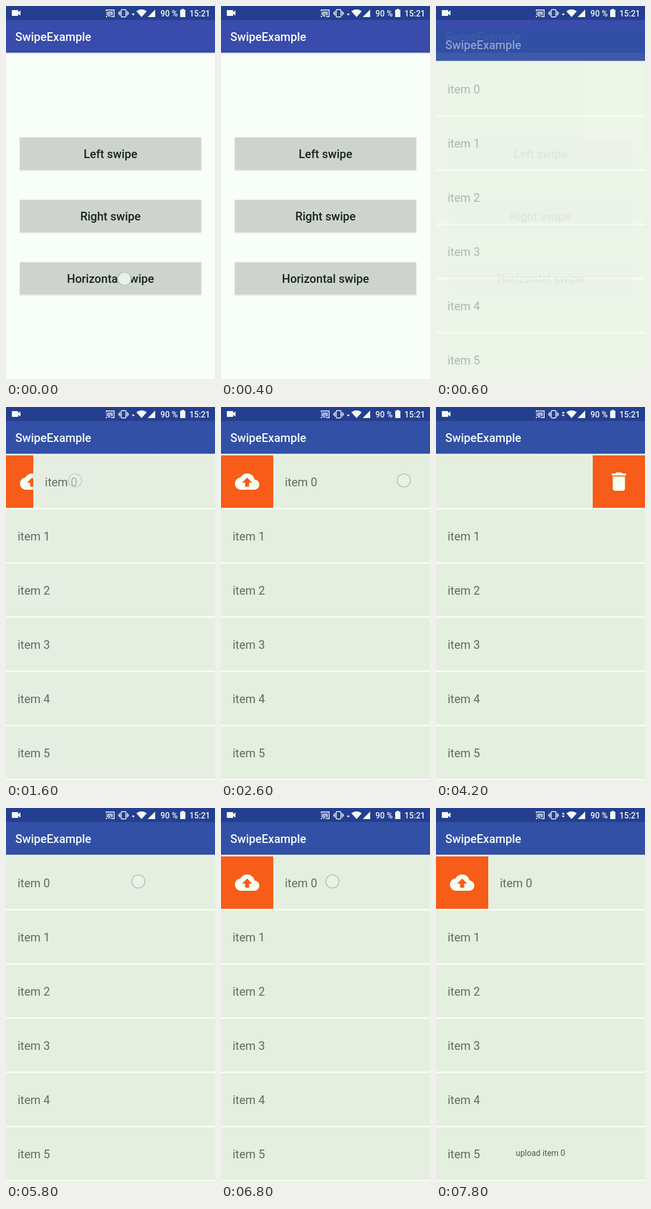
Write an HTML page that moves like this. It is 360x640 px and loops after 8000 ms.

```html
<!DOCTYPE html>
<html lang="en">
<head>
<meta charset="utf-8">
<title>Swipe list</title>
<style>
html, body { margin: 0; width: 100%; height: 100%; overflow: hidden; background: #f7fff8; }
svg { display: block; width: 100%; height: 100%; }
text { font: 20px Roboto, sans-serif; fill: #5f6c5f; }
.title { font-weight: 500; fill: #f6fbfa; }
.label { font-weight: 500; fill: #17251d; text-anchor: middle; }
.status text { font-size: 14px; font-weight: 500; fill: #f4f9fa; }
.toast { font-size: 14px; fill: #4f5a50; text-anchor: middle; }
</style>
</head>
<body>
<svg viewBox="0 0 360 640">
  <defs>
    <linearGradient id="shade" x2="0" y2="1">
      <stop stop-color="#6f8398" stop-opacity=".4"/>
      <stop offset="1" stop-color="#b9c6bf" stop-opacity="0"/>
    </linearGradient>
  </defs>

  <g id="menu">
    <rect width="360" height="640" fill="#f7fff8"/>
    <rect y="24" width="360" height="56" fill="#394bab"/>
    <rect y="80" width="360" height="3" fill="url(#shade)"/>
    <text class="title" x="16" y="60">SwipeExample</text>
    <g id="buttons"></g>
  </g>

  <g id="list">
    <rect y="24" width="360" height="640" fill="#f5fdf0"/>
    <g id="rows" class="content"></g>
    <g id="upload">
      <rect y="83" width="90" height="90" fill="#f75c19"/>
      <path transform="translate(24 107) scale(1.75)" fill="#f7fff0" d="M19.35 10.04C18.67 6.59 15.64 4 12 4 9.11 4 6.6 5.64 5.35 8.04 2.34 8.36 0 10.91 0 14c0 3.31 2.69 6 6 6h13c2.76 0 5-2.24 5-5 0-2.64-2.05-4.78-4.65-4.96zM14 13v4h-4v-4H7l5-5 5 5h-3z"/>
    </g>
    <g id="trash">
      <rect x="270" y="83" width="90" height="90" fill="#f75c19"/>
      <path transform="translate(294 107) scale(1.75)" fill="#f7fff0" d="M6 19c0 1.1.9 2 2 2h8c1.1 0 2-.9 2-2V7H6v12zM19 4h-3.5l-1-1h-5l-1 1H5v2h14V4z"/>
    </g>
    <g id="swiped" class="content"></g>
    <rect y="24" width="360" height="56" fill="#3250a6"/>
    <rect y="80" width="360" height="3" fill="url(#shade)"/>
    <text class="title content" x="16" y="60">SwipeExample</text>
  </g>

  <text class="toast" id="toast" x="180" y="597">upload item 0</text>

  <g class="status" fill="#f4f9fa">
    <rect width="360" height="24" fill="#243f90"/>
    <path d="M11 7h9q1 0 1 1v2.500l4-3v9l-4-3V16q0 1-1 1h-9q-1 0-1-1V8q0-1 1-1z"/>
    <g fill="none" stroke="#f4f9fa" stroke-width="1.400">
      <path d="M172.700 9V6.700h13.600v11.600H181M172.700 11.300a7 7 0 0 1 6.500 7M172.700 14a4.300 4.300 0 0 1 4 4.300"/>
      <rect x="198.500" y="6.200" width="8" height="12.600" rx="1"/>
      <path d="M196.300 8.500v8M194.300 10.500v4M208.700 8.500v8M210.700 10.500v4"/>
    </g>
    <rect x="172" y="17" width="2" height="2"/>
    <path d="M175 9.300h9v6.700h-3q-1.500-4-6-5z" opacity=".65"/>
    <path d="M216.700 13h5l-2.500 3.500z"/>
    <path id="sending" d="M216.700 11h5l-2.500-3.500z"/>
    <path d="M224.500 9q9-6.500 18 0l-9 10z"/>
    <path d="M257 6v13h-13z"/>
    <path d="M302.500 5h4v1.500h2.500V19h-9V6.500h2.500z"/>
    <text x="266" y="17.500">90 %</text>
    <text x="316" y="17.500">15:21</text>
  </g>

  <circle id="touch" r="11.300" fill="#eaf2e8" stroke="#b4c3bf" stroke-width="1.600"/>
</svg>

<script>
const DURATION = 8000, TICK = 200, FADE_IN = 500, FADE_OUT = 300;
const byId = id => document.getElementById(id);
const clamp = (v, low, high) => Math.min(high, Math.max(low, v));
const progress = (t, from, to) => clamp((t - from) / (to - from), 0, 1);

byId('buttons').innerHTML = ['Left swipe', 'Right swipe', 'Horizontal swipe'].map((name, i) => {
  const y = 226 + i * 107;
  return `<rect x="23" y="${y - 1}" width="314" height="58" rx="2" fill="#e2e9e2"/>
    <rect x="24" y="${y}" width="312" height="55" rx="1" fill="#ced4cd"/>
    <text class="label" x="180" y="${y + 35}">${name}</text>`;
}).join('');

const row = i => `<rect class="row" y="${83 + i * 93}" width="360" height="90"/>
  <text x="20" y="${136 + i * 93}">item ${i}</text>`;
byId('rows').innerHTML = [1, 2, 3, 4, 5].map(row).join('');
byId('swiped').innerHTML = row(0);

// A finger slides from x to x; "rest" is where the row settles.
const drags = [
  { start: 1360, end: 2600, from: 72, to: 315, rest: 90 },
  { start: 2700, end: 3800, from: 300, to: 110, rest: -90 },
  { start: 4600, end: 5800, from: 90, to: 228, rest: 0 },
  { start: 6200, end: 7200, from: 75, to: 270, rest: 90 }
];
const taps = [
  { start: -500, end: 0, from: 204, to: 204, y: 468 },
  { start: 7300, end: 7500, from: 45, to: 45, y: 128 }
];
const touches = [...drags, ...taps];

// The row follows the finger until it meets the resting place.
function rowShift(t) {
  return drags.reduce((shift, { start, end, from, to, rest }) => {
    const moved = shift + (to - from) * progress(t, start, end);
    return clamp(moved, Math.min(shift, rest), Math.max(shift, rest));
  }, 0);
}

function drawTouch(t) {
  const touch = touches.find(({ start, end }) => t >= start && t < end + FADE_OUT);
  show('touch', touch);
  if (!touch) return;
  const { start, end, from, to, y = 126 } = touch;
  const x = from + (to - from) * progress(t, start, end);
  const strength = progress(t, start, start + FADE_IN) * (1 - progress(t, end, end + FADE_OUT));
  byId('touch').setAttribute('transform', `translate(${x} ${y})`);
  byId('touch').setAttribute('fill-opacity', strength);
  byId('touch').setAttribute('stroke-opacity', Math.min(1, strength * 1.5));
}

function drawEntry(t) {
  const p = progress(t, 400, 800);
  byId('list').setAttribute('opacity', 1 - (1 - p) ** 4);
  byId('list').setAttribute('transform', `translate(0 ${56 * (1 - p) ** 2})`);
  document.querySelectorAll('.content').forEach(el => el.setAttribute('opacity', p));
}

const show = (id, on) => byId(id).setAttribute('visibility', on ? 'visible' : 'hidden');

function draw(t) {
  drawEntry(t);
  drawTouch(t);

  const shift = rowShift(t);
  byId('swiped').setAttribute('transform', `translate(${shift} 0)`);
  show('upload', shift > 0);
  show('trash', shift < 0);

  const tone = progress(t, 1400, 2400);
  document.querySelectorAll('.row').forEach(el =>
    el.setAttribute('fill', `rgb(${231 - 3 * tone} ${238 + tone} ${227 - 4 * tone})`));

  show('sending', (t >= 3800 && t < 4800) || t >= 7400);
  show('toast', t >= 7800);
}

const start = performance.now();
function frame() {
  const t = (performance.now() - start) % DURATION;
  draw(Math.floor(t / TICK) * TICK);
  requestAnimationFrame(frame);
}
frame();
</script>
</body>
</html>
```
